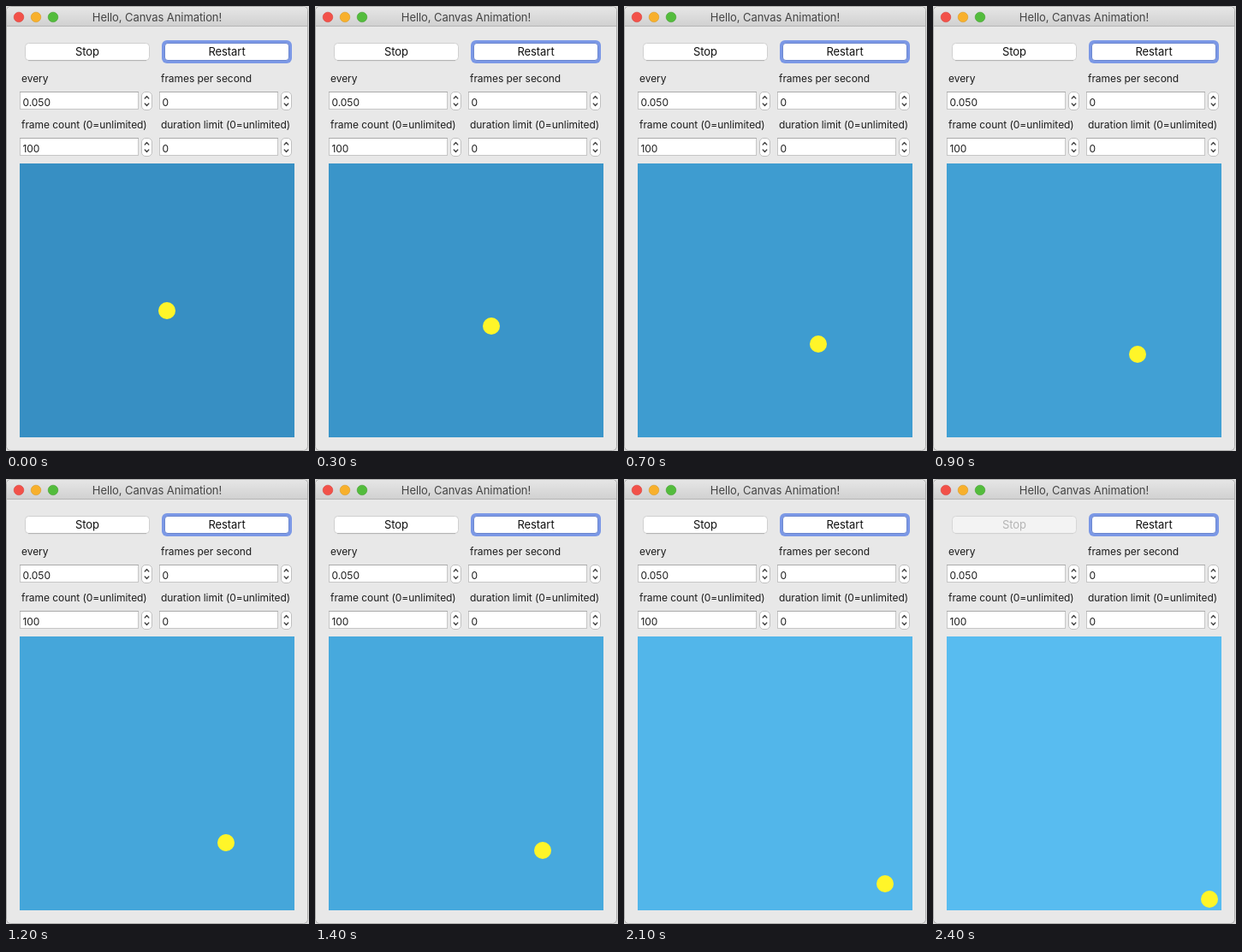
These frames come from a looping animation (354 px wide and 520 px high, 2.5 s). An HTML page:

```html
<!DOCTYPE html>
<html lang="en">
<head>
<meta charset="utf-8">
<title>Canvas Animation</title>
<style>
  html, body { margin: 0; width: 354px; height: 520px; overflow: hidden; background: #e8e8e8; }
  svg { display: block; }
  text { font: 12px Inter, Roboto, sans-serif; letter-spacing: -.05px; fill: #1c1c1c; }
  .title, .caption { font-size: 13px; text-anchor: middle; }
  .title { letter-spacing: -.08px; fill: #444; }
  .caption { fill: #111; }
  .off .caption { fill: #b5b5b5; }
  .off .face { fill: #f3f3f3; stroke: #d6d6d6; }
  .off .shade { stroke: #d0d0d0; }
  .face { fill: #fff; stroke: #cfcfcf; }
  .shade { stroke: #b0b0b0; }
  .arrows { fill: none; stroke: #444; stroke-width: 1.3; stroke-linecap: round; stroke-linejoin: round; }
</style>
</head>
<body>
<svg width="354" height="520" viewBox="0 0 354 520">
  <defs>
    <linearGradient id="bar" x2="0" y2="1">
      <stop stop-color="#e6e6e6"/>
      <stop offset="1" stop-color="#d1d1d1"/>
    </linearGradient>
    <g id="spin">
      <rect x=".5" y=".5" width="12" height="21" rx="4.5" fill="#fff" stroke="#c0c0c0"/>
      <path class="arrows" d="M4.2 8L6.5 5.5L8.8 8M4.2 14L6.5 16.5L8.8 14"/>
    </g>
    <g id="box">
      <rect x=".5" y=".5" width="138" height="20" fill="#fff" stroke="#c6c6c6"/>
      <path d="M0 .5H139" stroke="#aaa"/>
      <use href="#spin" x="142"/>
    </g>
  </defs>

  <rect width="354" height="520" fill="#d8d8d8"/>
  <rect x=".5" y=".5" width="352" height="519" rx="5" fill="#e8e8e8" stroke="#acacac"/>
  <path d="M1 23V6Q1 1 6 1H347Q352 1 352 6V23Z" fill="url(#bar)"/>
  <path d="M1 23.5H352" stroke="#b5b5b5"/>
  <g stroke-width=".6">
    <circle cx="15" cy="13" r="5.8" fill="#f25149" stroke="#d8423b"/>
    <circle cx="35" cy="13" r="5.8" fill="#f8b02c" stroke="#d99a25"/>
    <circle cx="55" cy="13" r="5.8" fill="#53bc3c" stroke="#44a030"/>
  </g>
  <text class="title" x="176.5" y="18">Hello, Canvas Animation!</text>

  <g id="stop">
    <rect class="face" x="22.5" y="43.5" width="145" height="20" rx="4"/>
    <path class="shade" d="M26 63.7H164"/>
    <text class="caption" x="95" y="58">Stop</text>
  </g>
  <rect x="182" y="40" width="152" height="27" rx="6" fill="#7b98e6"/>
  <rect x="185.5" y="43.5" width="145" height="20" rx="3.5" fill="#fff" stroke="#6c87cf"/>
  <text class="caption" x="258" y="58">Restart</text>

  <text x="18" y="89">every</text>
  <text x="181" y="89">frames per second</text>
  <text x="18" y="143">frame count (0=unlimited)</text>
  <text x="181" y="143">duration limit (0=unlimited)</text>

  <use href="#box" x="16" y="100"/>
  <use href="#box" x="179" y="100"/>
  <use href="#box" x="16" y="154"/>
  <use href="#box" x="179" y="154"/>
  <text x="19.5" y="117">0.050</text>
  <text x="182.5" y="117">0</text>
  <text x="19.5" y="171">100</text>
  <text x="182.5" y="171">0</text>

  <rect id="sky" x="16" y="184" width="321" height="320" fill="rgb(55,143,195)"/>
  <circle id="ball" cx="188" cy="356" r="10" fill="#fff529"/>
</svg>
<script>
  const [stop, sky, ball] = ['stop', 'sky', 'ball'].map(id => document.getElementById(id));
  const LOOP = 2500, TICK = 100, LAST = 24;

  function draw(now) {
    const tick = Math.floor(now % LOOP / TICK);
    // The ball advances 3px per step; the sky brightens with it.
    const step = Math.round(tick * 1.875);
    const red = Math.round(55 + step * .5 + step * step * .005);
    ball.setAttribute('cx', 188 + 3 * step);
    ball.setAttribute('cy', 356 + 3 * step);
    sky.setAttribute('fill', `rgb(${red},${143 + step},${195 + step})`);
    stop.classList.toggle('off', tick === LAST);
  }

  const start = performance.now();
  function loop() {
    draw(performance.now() - start);
    requestAnimationFrame(loop);
  }
  loop();
</script>
</body>
</html>
```
